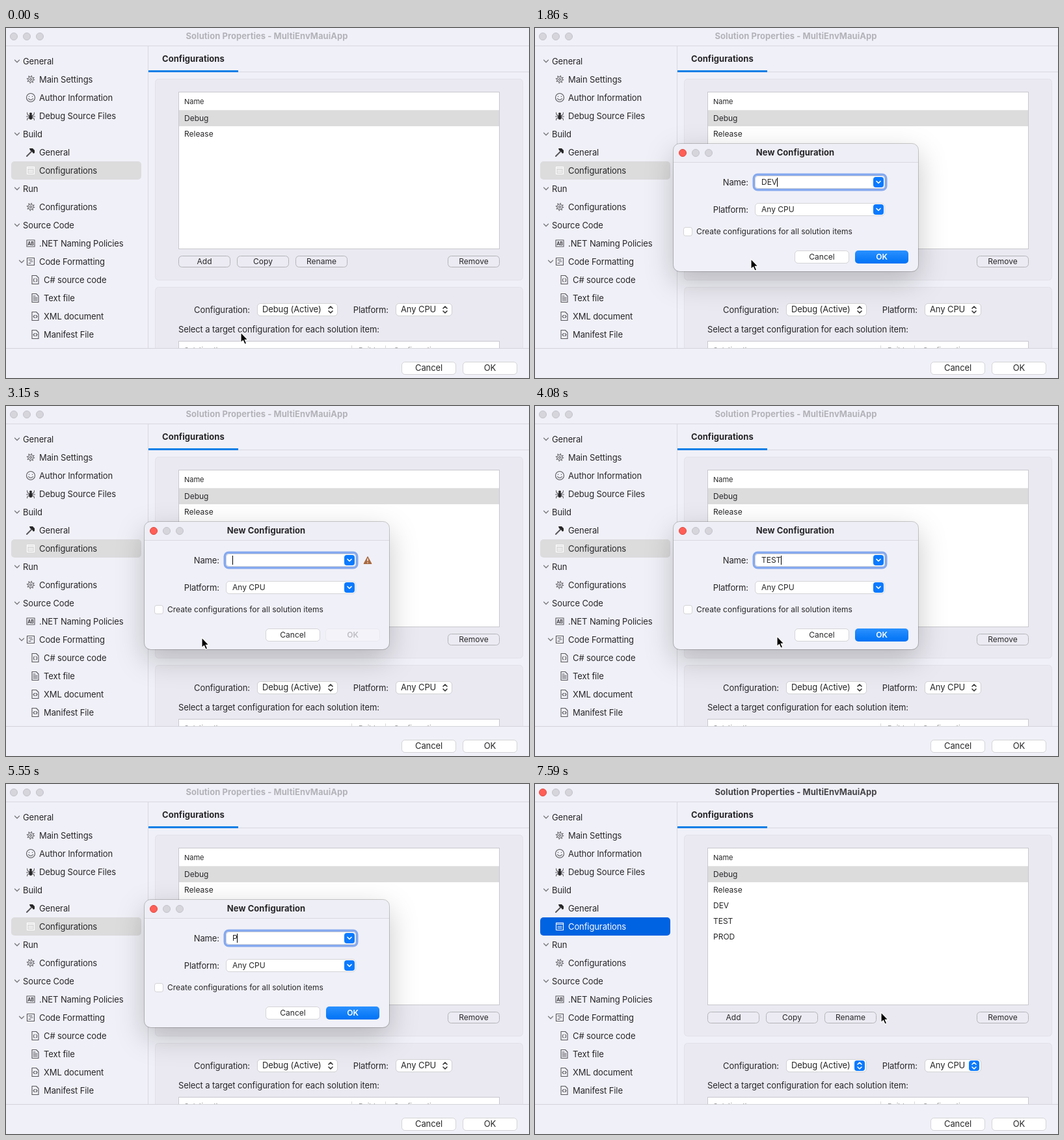
Animation of 804x538 px, one loop 7620 ms. Source, as an HTML page:

```html
<!DOCTYPE html>
<html lang="en">
<head>
<meta charset="utf-8">
<title>Solution Properties</title>
<style>
  html, body { margin: 0; width: 100%; height: 100%; overflow: hidden; background: #f0f0f8; }
  svg { display: block; font: 13px Inter, sans-serif; letter-spacing: -.008em; fill: #262628; }
  .small { font-size: 12px; letter-spacing: 0; }
  .tiny { font-size: 11px; letter-spacing: 0; }
  .bold { font-weight: 700; letter-spacing: .004em; }
  .semi { font-weight: 600; }
  .mid { text-anchor: middle; }
  .end { text-anchor: end; }
  .line { fill: none; stroke: #56565a; stroke-width: 1.1; stroke-linecap: round; stroke-linejoin: round; }
  .chev { fill: none; stroke: #77777c; stroke-width: 1.3; stroke-linecap: round; stroke-linejoin: round; }
  .control { fill: #fff; stroke: #000; stroke-opacity: .14; }
  .push { fill: #ecebf3; stroke: #b4b4ba; }
  .light { fill: #d6d5dc; stroke: #c3c2ca; }
  .red { fill: #ff5f57; stroke: #e2493f; }
  .blue { fill: #0a7aff; }
  .white { fill: none; stroke: #fff; stroke-width: 1.7; stroke-linecap: round; stroke-linejoin: round; }
  #title { fill: #b3b2b9; }
  #selection { fill: #dcdcdd; }
  .step { fill: none; stroke: #333; stroke-width: 1.6; stroke-linecap: round; stroke-linejoin: round; }
  .accent { display: none; }
  .active .accent { display: inline; }
  .active #title { fill: #454548; }
  .active #selection { fill: #0063e1; }
  .active .selected { fill: #fff; }
  .active .step { stroke: #fff; }
  .active #mainClose { fill: #ff5f57; stroke: #e2493f; }
  #panel { filter: drop-shadow(0 15px 22px rgba(0, 0, 0, .22)); }
</style>
</head>
<body>
<svg id="stage" width="804" height="538" viewBox="0 0 804 538"></svg>
<script>
const LOOP = 7620, STEP = 30, FADE = 150;

const sessions = [
  { open: 840, name: 'DEV', keys: [1290, 1410, 1560], move: 1710, close: 2340 },
  { open: 3000, name: 'TEST', keys: [3360, 3480, 3570, 3690], move: 3840, close: 4500 },
  { open: 4920, name: 'PROD', keys: [5370, 5610, 5700, 5820], move: 5970, close: 6750 },
];
// start time, duration, destination
const moves = [
  [30, 540, 301, 356], [1710, 630, 519, 350], [2520, 390, 301, 356],
  [3840, 630, 519, 350], [4620, 270, 301, 356], [5970, 480, 501, 347], [6480, 210, 532, 351],
];

// y is the middle of the capitals; baselines sit on whole pixels
const text = (x, y, label, cls = '', extra = '') =>
  `<text x="${x}" y="${Math.floor(y + 5)}" class="${cls}" ${extra}>${label}</text>`;
const box = (x, y, w, h, r, attrs) =>
  `<rect x="${x}" y="${y}" width="${w}" height="${h}" rx="${r}" ${attrs}/>`;
const path = (d, cls, x = 0, y = 0) =>
  `<path class="${cls}" transform="translate(${x} ${y})" d="${d}"/>`;
const control = (x, y, w, h = 20, cls = 'control') =>
  box(x + .5, y + .5, w - 1, h - 1, 5, `class="${cls}"`);
const button = (x, y, w, h, label, cls, kind = 'control') =>
  control(x, y, w, h, kind) + text(x + w / 2, y + h / 2 - .5, label, 'mid ' + cls);
const lights = (x, y, id, cls) => [0, 20, 40].map((dx, i) =>
  `<circle cx="${x + dx}" cy="${y}" r="5.5" class="light ${i ? '' : cls}" ${i ? '' : id}/>`).join('');

const DOC = 'M-5-6.5h6.500l3.500 3.500v9.500h-10z';
const icons = {
  gear: (x, y) => `<circle cx="${x}" cy="${y}" r="4" class="line"/><circle cx="${x}" cy="${y}" r="1.500" class="line"/>` +
    `<circle cx="${x}" cy="${y}" r="5.400" class="line" style="stroke-dasharray:1.3 2.941;stroke-width:1.6;stroke-linecap:butt"/>`,
  face: (x, y) => `<circle cx="${x}" cy="${y}" r="6.500" class="line"/>` +
    path('M-2.500-2v.5M2.500-2v.5M-3.500 1.500Q0 5.500 3.500 1.500', 'line', x, y),
  bug: (x, y) => `<ellipse cx="${x}" cy="${y + 2}" rx="2.800" ry="3.800"/><circle cx="${x}" cy="${y - 3}" r="2"/>` +
    path('M-2 0L-5-2-5.500-5M2 0L5-2 5.500-5M-2 1H-6.500M2 1H6.500M-2 3L-5 4-5.500 6.500M2 3L5 4 5.500 6.500', 'line', x, y),
  hammer: (x, y) => path('M-6 6L2-2', 'line" style="stroke-width:2', x, y) +
    path('M-2-6H3L6-3V1L4 2 2-1-1-3z', '', x, y),
  window: (x, y) => path('M-5.500-5.500h11v11h-11zM-5.500-3.500h11M-3 0h6M-3 2.500h6', 'step" style="stroke:#fff;stroke-width:1.1', x, y),
  letters: (x, y) => path('M-6-5H6V5H-6z', 'line', x, y) +
    `<text x="${x}" y="${y + 2.700}" class="mid semi" font-size="7">AB</text>`,
  format: (x, y) => path('M-5.500-5.500h11v11h-11zM-3-2.500h5M-1 0h4M-3 2.500h3', 'line', x, y),
  braces: (x, y) => path(DOC + 'M-1-2Q-2.500-2-2.500 0T-2.500 1Q-2.500 3-1 3M1-2Q2.500-2 2.500 0T2.500 1Q2.500 3 1 3', 'line', x, y),
  lines: (x, y) => path(DOC + 'M-3-3h3M-3-.8h6M-3 1.500h6M-3 3.800h6', 'line', x, y),
  code: (x, y) => path(DOC + 'M-1-1.500L-3 .5-1 2.500M1-1.500L3 .5 1 2.500', 'line', x, y),
};

// label, indent, icon (no icon: section heading)
const tree = [
  ['General', 26], ['Main Settings', 51, 'gear'], ['Author Information', 51, 'face'],
  ['Debug Source Files', 51, 'bug'], ['Build', 26], ['General', 51, 'hammer'],
  ['Configurations', 51, 'window'], ['Run', 26], ['Configurations', 51, 'gear'],
  ['Source Code', 26], ['.NET Naming Policies', 51, 'letters'], ['Code Formatting', 51, 'format'],
  ['C# source code', 58, 'braces'], ['Text file', 58, 'lines'],
  ['XML document', 58, 'code'], ['Manifest File', 58, 'code'],
];
const DOWN = 'M-3.500-1.700L0 1.700 3.500-1.700';
const sidebar = tree.map(([label, x, icon], i) => {
  const y = 51 + i * 28;
  const arrow = !icon ? path(DOWN, 'chev', 17, y) : icon === 'format' ? path(DOWN, 'chev', 24, y) : '';
  return arrow + (icon ? icons[icon](x - 13, y) : '') + text(x, y, label, icon === 'window' ? 'selected' : '');
}).join('');

const popup = (x, w, label) => control(x, 423, w) + text(x + 8, 432.5, label) +
  box(x + w - 19, 425, 16, 16, 4, 'class="blue accent"') +
  path('M-3-2L0-5 3-2M-3 2L0 5 3 2', 'step', x + w - 11, 433);

const combo = (y, label) => control(338, y - 10, 200) + text(348, y - .5, label[0], 'small', label[1]) +
  box(520, y - 8, 16, 16, 4, 'class="blue"') + path('M-3-1.500L0 1.500 3-1.500', 'white', 528, y);

const mainWindow = `
  ${box(0, 0, 804, 538, 0, 'fill="#f0f0f8"')}
  ${lights(12, 13, 'id="mainClose"', '')}
  ${text(401, 12.5, 'Solution Properties - MultiEnvMauiApp', 'bold mid', 'id="title"')}
  <path d="M0 27.500H804M218.500 28V492M219 67.500H804" stroke="#d9d8e0"/>
  ${box(8, 205, 200, 28, 5, 'id="selection"')}
  ${sidebar}
  ${text(240, 47.5, 'Configurations', 'bold')}
  ${box(219, 65, 138, 3, 0, 'fill="#087fe6"')}
  <g fill="#eae9f1" stroke="#e2e1e9">${box(229.5, 78.5, 565, 309, 5, '')}${box(229.5, 398.5, 565, 120, 5, '')}</g>
  ${box(265.5, 98.5, 493, 241, 0, 'fill="#fff" stroke="#c8c8ce"')}
  ${box(266, 127, 492, 24, 0, 'fill="#dcdcdd"')}
  <path d="M266 126.500H758" stroke="#e4e4e6"/>
  ${text(274, 112.5, 'Name', 'tiny')}
  ${['Debug', 'Release'].map((s, i) => text(274, 138.5 + i * 24, s, 'small')).join('')}
  ${sessions.map((s, i) => text(274, 186.5 + i * 24, s.name, 'small added')).join('')}
  ${[['Add', 265], ['Copy', 355], ['Rename', 445], ['Remove', 679]]
    .map(([s, x]) => button(x, 350, 80, 18, s, 'small', 'push')).join('')}
  ${text(375, 433, 'Configuration:', 'end')}${popup(386, 124, 'Debug (Active)')}
  ${text(588, 433, 'Platform:', 'end')}${popup(599, 87, 'Any CPU')}
  ${text(265, 463.5, 'Select a target configuration for each solution item:')}
  ${box(265.5, 481.5, 493, 40, 0, 'fill="#fff" stroke="#c8c8ce"')}
  <path d="M531.500 488V492M583.500 488V492" stroke="#d8d8dc"/>
  <g opacity=".5">${text(274, 494, 'Solution Item', 'tiny')}${text(542, 494, 'Build', 'tiny')}${text(596, 494, 'Configuration', 'tiny')}</g>
  ${box(0, 492, 804, 46, 0, 'fill="#f0f0f8"')}
  <path d="M0 492.500H804" stroke="#d4d3db"/>
  ${button(608, 513, 84, 20, 'Cancel', '')}${button(702, 513, 84, 20, 'OK', '')}`;

const dialogWindow = `
  ${box(213, 178, 376, 196, 10, 'id="panel" fill="#f0f0f8"')}
  <path d="M213 206V188Q213 178 223 178H579Q589 178 589 188V206z" fill="#eeeef6"/>
  <path d="M213 206.500H589" stroke="#d9d8e0"/>
  ${box(212.5, 177.5, 377, 197, 10, 'fill="none" stroke="#000" stroke-opacity=".2"')}
  ${lights(227, 192, '', 'red')}
  ${text(400, 191.5, 'New Configuration', 'bold mid')}
  ${text(328, 237.5, 'Name:', 'end')}${text(328, 279.5, 'Platform:', 'end')}
  ${box(336.25, 225.25, 203.5, 23.5, 6, 'fill="none" stroke="#85a9ee" stroke-width="3.5"')}
  ${combo(237, ['', 'id="field"'])}${combo(279, ['Any CPU', ''])}
  <path id="caret" stroke="#000" d="M.5 230V244"/>
  <g id="warning"><path d="M556 231.500L562 242.500H550z" fill="#a9693f" stroke="#a9693f" stroke-linejoin="round"/>
    <path d="M556 234.500V238.500M556 240.300V241.500" stroke="#fff" stroke-width="1.400"/></g>
  ${box(228.5, 306.5, 13, 13, 3, 'class="control"')}
  ${text(248, 312.5, 'Create configurations for all solution items', 'small')}
  ${button(399, 342, 84, 20, 'Cancel', 'small')}
  <g id="okOff" opacity=".25">${button(491, 342, 84, 20, 'OK', 'small semi')}</g>
  <g id="okOn">${box(492, 342, 82, 20, 5, 'fill="url(#shine)"')}${text(533, 351.5, 'OK', 'small semi mid', 'style="fill:#fff"')}</g>`;

const stage = document.getElementById('stage');
stage.innerHTML = `
  <defs><linearGradient id="shine" x2="0" y2="1"><stop stop-color="#2a91ff"/><stop offset="1" stop-color="#0072f5"/></linearGradient></defs>
  <g id="main">${mainWindow}</g>
  <g id="dialog">${dialogWindow}</g>
  <path id="cursor" d="M0 0V15.500L3.500 12.300 6 18 8.600 16.900 6.200 11.400H11z" fill="#000" stroke="#fff" stroke-width="1.100"/>`;

const get = id => document.getElementById(id);
const [main, dialog, cursor, field, caret, warning, okOn, okOff] =
  ['main', 'dialog', 'cursor', 'field', 'caret', 'warning', 'okOn', 'okOff'].map(get);
const added = [...document.querySelectorAll('.added')];
const show = (el, on) => { el.style.display = on ? '' : 'none'; };
const clamp = v => Math.max(0, Math.min(1, v));
const ease = u => u * u * (3 - 2 * u);

function cursorAt(t) {
  let x = 361, y = 468;
  for (const [start, span, toX, toY] of moves) {
    const u = ease(clamp((t - start) / span));
    x += (toX - x) * u;
    y += (toY - y) * u;
  }
  return [x, y];
}

function render(t) {
  const session = sessions.find(s => t >= s.open && t < s.close + FADE);
  const modal = session && t < session.close;
  main.classList.toggle('active', t >= 600 && !modal);
  sessions.forEach((s, i) => show(added[i], t >= s.close));

  show(dialog, session);
  if (session) {
    const { open, name, keys, close } = session;
    const typed = keys.filter(k => t >= k).length;
    const lastInput = typed ? keys[typed - 1] : open;
    dialog.setAttribute('opacity', Math.min(clamp((t - open + 30) / 90), clamp(1 - (t - close) / FADE)));
    field.textContent = name.slice(0, typed);
    const end = typed ? field.getComputedTextLength() : 0;
    caret.setAttribute('transform', `translate(${Math.round(348 + end - .5)} 0)`);
    show(caret, modal && (t - lastInput) % 1000 < 500);
    show(warning, !typed);
    show(okOn, typed);
    show(okOff, !typed);
  }

  // typing hides the pointer until the mouse moves again
  show(cursor, !sessions.some(s => t >= s.keys[0] && t < s.move));
  cursor.setAttribute('transform', `translate(${cursorAt(t).map(Math.round)})`);
}

const began = performance.now();
function tick() {
  const t = (performance.now() - began) % LOOP;
  render(Math.floor(t / STEP) * STEP);
  requestAnimationFrame(tick);
}
tick();
</script>
</body>
</html>
```
